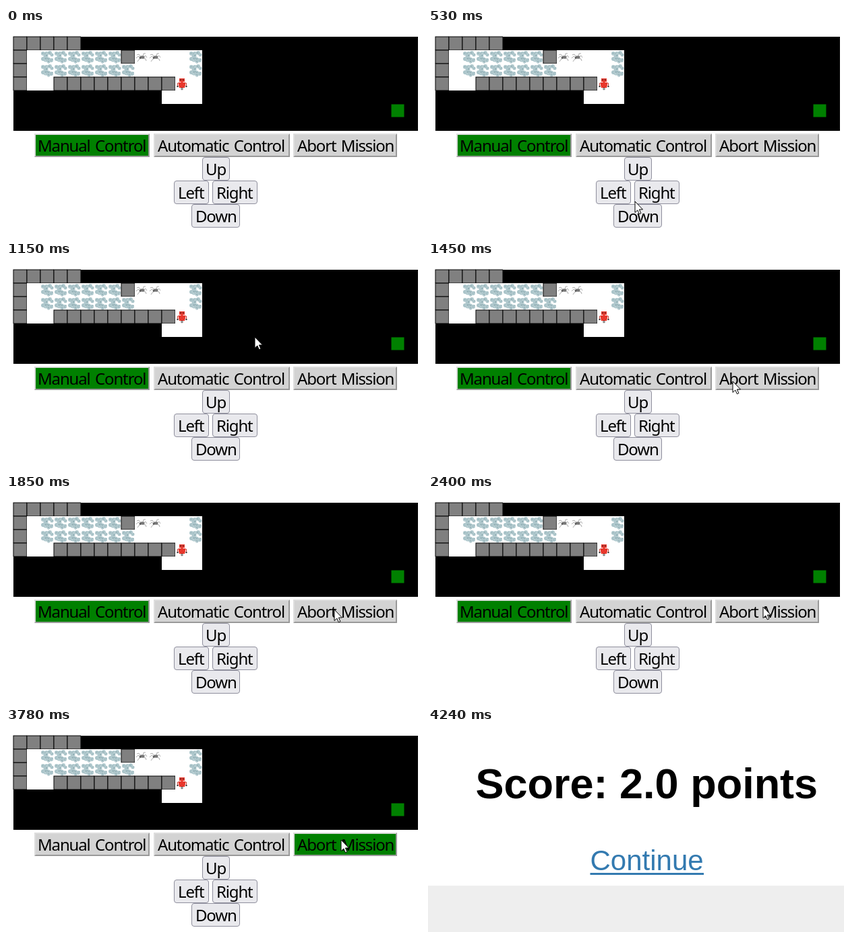
Recreate the animation shown at these times as an HTML page. Size 617 by 305 pixels, loop 5.04 s.

```html
<!DOCTYPE html>
<html lang="en">
<head>
<meta charset="utf-8">
<title>Robot mission</title>
<style>
html, body { margin: 0; height: 100%; overflow: hidden; background: #fff; }
svg { display: block; width: 617px; height: 305px; }
.ui { font: 24px "Noto Sans", "Open Sans", sans-serif; letter-spacing: -1.15px; word-spacing: 2.3px; }
.score { font: bold 63px "Liberation Sans", Arial, sans-serif; }
.link { font: 42px "Liberation Sans", Arial, sans-serif; fill: #337ab0; }
</style>
</head>
<body>
<svg viewBox="0 0 617 305">
  <defs>
    <g id="wall">
      <path d="M-.5-.5H20V20H-.5z"/>
      <path fill="#808080" d="M.5 .5h19v19H.5z"/>
    </g>
    <g id="dust"></g>
    <g id="spider" fill="none" stroke="#999" stroke-width=".8">
      <path d="M9 10L6 6 3 7M9 11L5 9 2 12M9 12L6 14 4 17M12 10L13 5 16 5M12 11L16 8 18 11M12 12L16 13 17 16"/>
      <ellipse cx="11" cy="10.500" rx="3.500" ry="2.200" fill="#777" stroke="none"/>
      <circle cx="8" cy="11.500" r="1.300" fill="#555" stroke="none"/>
    </g>
    <g id="robot">
      <path fill="none" stroke="#c8372c" d="M5.500 9H3.500V15M14.500 9h2V15"/>
      <path fill="#e8372c" d="M6 2h8v5h-2.500v1H15v4l-1 4H6l-1-4V8h3.500V7H6z"/>
      <path fill="#333" d="M7.500 3.500h1.500v1.500H7.500zM11 3.500h1.500v1.500H11zM2.500 13h2v2h-2zM15.500 13h2v2h-2z"/>
      <circle cx="10" cy="17.500" r="1.300" fill="#fff" stroke="#444"/>
    </g>
  </defs>
  <g id="game">
    <path d="M11 13h600v140H11z"/>
    <path fill="#fff" d="M31 33h260v80h-60V93H31z"/>
    <g id="cells"></g>
    <path fill="green" d="M571.500 113.500h19v19h-19z"/>
    <g id="buttons" class="ui"></g>
    <circle id="click" cx="496" cy="171" r="14" fill="#f2dc2e" fill-opacity=".8"/>
    <path id="cursor" fill="#fff" stroke="#000" d="M0 0V16.500L3.800 13 6.400 18.800 8.900 17.700 6.400 12H11.500Z"/>
  </g>
  <g id="result">
    <path fill="#eee" d="M0 236h617v69H0z"/>
    <text class="score" x="70.500" y="106">Score: 2.0 points</text>
    <text class="link" x="240.500" y="212.500">Continue</text>
    <path fill="#337ab0" d="M240.500 217h168.500v3H240.500z"/>
  </g>
</svg>
<script>
const $ = id => document.getElementById(id);

function add(parent, tag, attrs, text = "") {
  const el = document.createElementNS("http://www.w3.org/2000/svg", tag);
  for (const k in attrs) el.setAttribute(k, attrs[k]);
  el.textContent = text;
  return parent.appendChild(el);
}

// Dust: a few overlapping puffs with seeded speckles
let seed = 7;
const rnd = () => (seed = seed * 16807 % 2147483647) / 2147483647;
const puffs = [[4, 5, 3], [9, 5, 3], [14, 4, 3], [17, 7, 2.5], [8, 9, 3.5],
               [4, 13, 3], [8, 14, 3.5], [12, 17, 2.5], [16, 15, 3], [12, 13, 2.5]];
for (const [cx, cy, r] of puffs) add($("dust"), "circle", { cx, cy, r, fill: "#afc8cd" });
for (let i = 0; i < 50; i++) {
  const [x, y, r] = puffs[i % puffs.length], a = rnd() * 6.283, d = rnd() * r;
  add($("dust"), "circle", {
    cx: x + d * Math.cos(a), cy: y + d * Math.sin(a), r: .4 + rnd() * .4,
    fill: ["#86a4ab", "#98b4ba", "#cddcdf"][i % 3]
  });
}

// W wall, D dust, S spider, R robot
const kinds = { W: "wall", D: "dust", S: "spider", R: "robot" };
["WWWWW", "W DDDDDDWSS  D", "W DDDDDDD    D", "W  WWWWWWWWWR"].forEach((row, r) =>
  [...row].forEach((c, i) => kinds[c] &&
    add($("cells"), "use", { href: "#" + kinds[c], x: 11 + 20 * i, y: 13 + 20 * r })));

function label(x, y, text) {
  add($("buttons"), "text", { x, y }, text);
}

function modeButton(x, w, textX, text) {
  const g = $("buttons"), y = 157, h = 35;
  const light = add(g, "path", { d: `M${x} ${y + h}V${y}h${w}l-2 2H${x + 2}v${h - 4}z` });
  const dark = add(g, "path", { d: `M${x} ${y + h}h${w}V${y}l-2 2v${h - 4}H${x + 2}z` });
  const face = add(g, "rect", { x: x + 2, y: y + 2, width: w - 4, height: h - 4 });
  label(textX, 184, text);
  return (active, pressed) => {
    light.setAttribute("fill", pressed ? "#999" : "#dedede");
    dark.setAttribute("fill", pressed ? "#dedede" : "#999");
    face.setAttribute("fill", active ? "green" : "#d3d3d3");
  };
}

function keyButton(x, y, w, textX, text) {
  add($("buttons"), "rect", {
    x: x + .5, y: y + .5, width: w - 1, height: 34, rx: 3.5, fill: "#e9e9ed", stroke: "#8f8f9d"
  });
  label(textX, y + 27, text);
}

const manual = modeButton(42, 171, 47, "Manual Control");
const auto = modeButton(219, 202, 225, "Automatic Control");
const abort = modeButton(426, 154, 432, "Abort Mission");
keyButton(291, 192, 41, 296, "Up");
keyButton(249, 227, 52, 255, "Left");
keyButton(306, 227, 67, 312, "Right");
keyButton(275, 262, 72, 281, "Down");

// Pointer stops: step, x, y
const stops = [[0, 310, 283], [5, 285, 46], [13, 452, 179], [20, 496, 170]];

function pointer(t) {
  if (t >= 2400) return [497, 168];
  const step = Math.min(20, Math.floor((t - 470) / 76.5 + .21));
  const i = Math.max(1, stops.findIndex(s => s[0] >= step));
  const [s0, x0, y0] = stops[i - 1], [s1, x1, y1] = stops[i];
  const u = (step - s0) / (s1 - s0), e = u * u * (3 - 2 * u);
  return [Math.round(x0 + (x1 - x0) * e), Math.round(y0 + (y1 - y0) * e)];
}

const show = (id, on) => $(id).setAttribute("visibility", on ? "visible" : "hidden");
const start = performance.now();

function draw() {
  const t = Math.max(0, performance.now() - start) % 5040;
  const done = t >= 4240, aborted = t >= 3780, pressed = t >= 3320 && !aborted;
  $("game").style.display = done ? "none" : "";
  show("result", done);
  show("click", pressed);
  show("cursor", t >= 470);
  $("cursor").setAttribute("transform", `translate(${pointer(Math.max(t, 470))})`);
  manual(!aborted);
  auto(false);
  abort(aborted, pressed);
  requestAnimationFrame(draw);
}
draw();
</script>
</body>
</html>
```
